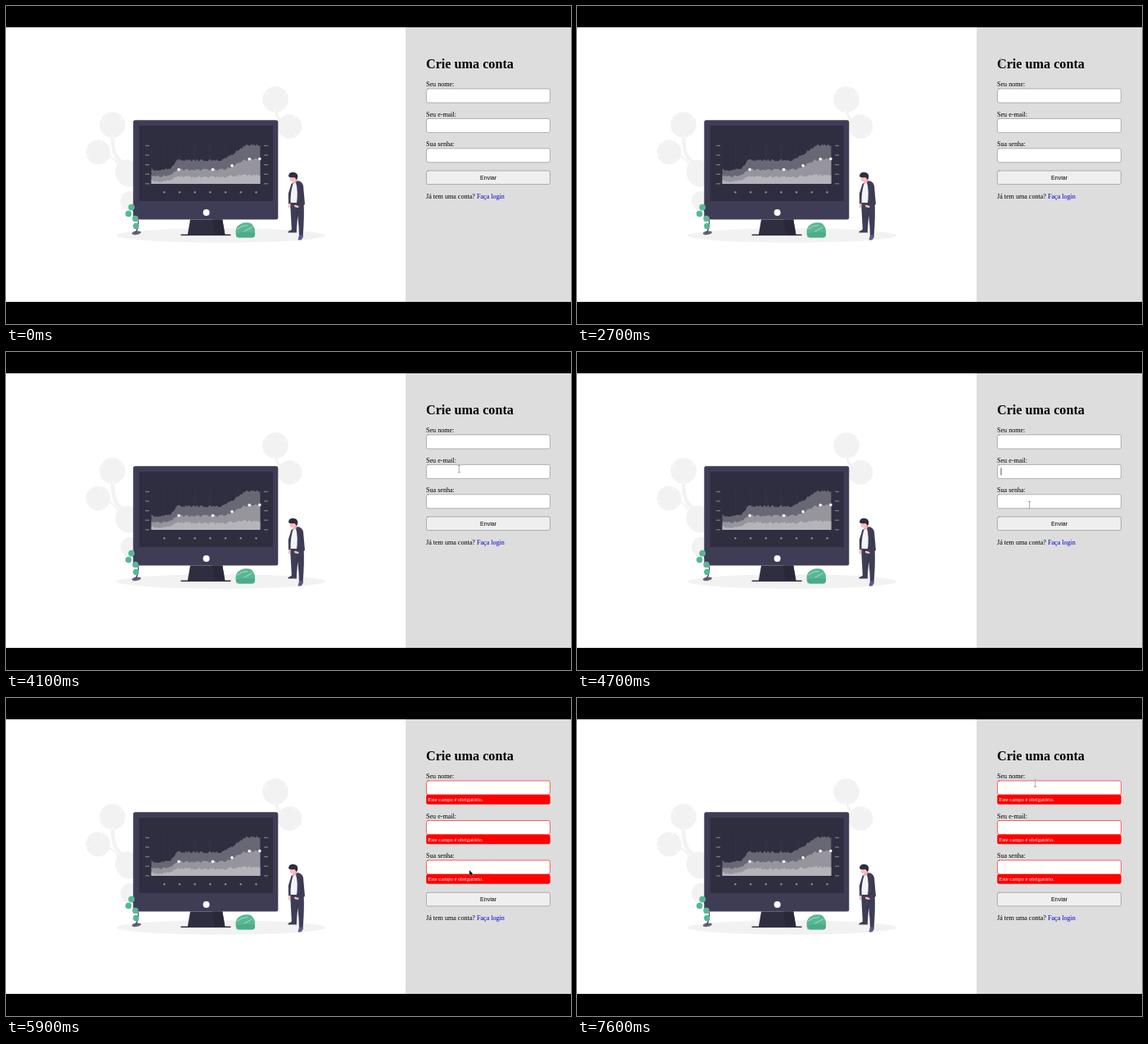
These frames come from a looping animation (690x388 px, 8000 ms). An HTML page with a canvas:

```html
<!DOCTYPE html>
<html lang="pt">
<head>
<meta charset="utf-8">
<title>Crie uma conta</title>
<style>
html, body { margin: 0; width: 100%; height: 100%; overflow: hidden; background: #000; }
canvas { display: block; width: 690px; height: 388px; }
</style>
</head>
<body>
<canvas id="stage" width="690" height="388"></canvas>
<script>
const ctx = document.getElementById('stage').getContext('2d');
const LOOP = 8000, STEP = 100, FAIL_AT = 5900;
const ZOOM = 690 / 1366;
const SERIF = '"Liberation Serif", "Times New Roman", serif';
const SANS = '"Liberation Sans", Arial, sans-serif';
const NAVY = '#3f3d56', DARK = '#2f2e41', PALE = '#f2f2f2', GREEN = '#57b894', SKIN = '#fbbebe';

// ---- helpers ----
function smooth(v, from, to) {
  const u = Math.min(1, Math.max(0, (v - from) / (to - from)));
  return u * u * (3 - 2 * u);
}
function randomizer(seed) {
  return () => (seed = seed * 16807 % 2147483647) / 2147483647;
}
function rect(x, y, w, h, fill) {
  ctx.fillStyle = fill;
  ctx.fillRect(x, y, w, h);
}
function round(x, y, w, h, r, fill, stroke) {
  ctx.beginPath();
  ctx.roundRect(x, y, w, h, r);
  ctx.fillStyle = fill;
  ctx.fill();
  if (stroke) {
    ctx.strokeStyle = stroke;
    ctx.lineWidth = 0.6;
    ctx.stroke();
  }
}
function oval(x, y, rx, ry, fill, turn = 0) {
  ctx.beginPath();
  ctx.ellipse(x, y, rx, ry, turn, 0, 7);
  ctx.fillStyle = fill;
  ctx.fill();
}
const disc = (x, y, r, fill) => oval(x, y, r, r, fill);
function shape(d, fill) {
  ctx.fillStyle = fill;
  ctx.fill(new Path2D(d));
}
function line(d, color, width) {
  ctx.strokeStyle = color;
  ctx.lineWidth = width;
  ctx.lineCap = 'round';
  ctx.stroke(new Path2D(d));
}
// Sizes are page pixels before zooming
function text(str, x, y, size, color, family = SERIF, weight = '', align = 'left') {
  ctx.save();
  ctx.translate(x, y);
  ctx.scale(ZOOM, ZOOM);
  ctx.font = `${weight} ${size}px ${family}`;
  ctx.textAlign = align;
  ctx.fillStyle = color;
  ctx.fillText(str, 0, 0);
  ctx.restore();
}

// ---- illustration ----
// Round leaf with three small slits at its rim
function leaf(x, y, r, turn) {
  disc(x, y, r, PALE);
  for (let i = 0; i < 3; i++) {
    const a = turn + i * 2.1, c = Math.cos(a), s = Math.sin(a);
    line(`M${x + c * r} ${y + s * r}L${x + c * r * 0.75} ${y + s * r * 0.75}`, '#fff', 1);
  }
}

function foliage() {
  line('M130 158C130 188 139 187 151 199', PALE, 4.5);
  line('M114 180Q132 182 137 194', PALE, 2);
  line('M329 126Q331 139 339 143', PALE, 3);
  leaf(130, 145, 15.7, 3.6);
  leaf(112.5, 178.5, 15, 2.9);
  leaf(329, 114, 15.8, 3.7);
  leaf(346.5, 147, 14.8, 1);
  oval(149, 204, 15, 17, PALE, -0.5);
  oval(151, 238, 11, 12, PALE);
}

// Levels jump once near the left and climb again near the right
function level([base, jump, climb], x) {
  return base - jump * smooth(x, 198, 211) - climb * smooth(x, 260, 299);
}

function ridge(curve, seed, fill) {
  const random = randomizer(seed);
  ctx.beginPath();
  ctx.moveTo(177.6, 217);
  for (let x = 177.6; x < 310; x += 1.5) ctx.lineTo(x, level(curve, x) + (random() - 0.5) * 3);
  ctx.lineTo(310.4, level(curve, 310));
  ctx.lineTo(310.4, 217);
  ctx.fillStyle = fill;
  ctx.fill();
}

function chart() {
  const middle = [207.5, 7.5, 13];
  for (let i = 0; i < 7; i++) {
    const x = 193.3 + i * 18.7;
    rect(x - 0.25, 168, 0.5, 49, '#393848');
    disc(x, 227.2, 1.2, '#8b8a94');
  }
  for (let i = 0; i < 5; i++) {
    const y = 169.8 + i * 11.6;
    rect(170, y, 5, 1.3, '#777683');
    rect(315, y, 5, 1.3, '#777683');
  }
  ridge([199.5, 11.5, 18.5], 41, '#686774');
  ridge(middle, 97, '#96959e');
  ridge([213.5, 5, 2.5], 63, '#b5b4bb');
  for (const x of [211, 252.5, 276, 297.2, 309.8]) disc(x, level(middle, x) - 0.4, 1.8, '#fff');
}

function monitor() {
  round(155.3, 139.3, 177, 121.2, 2.5, NAVY);
  rect(162.5, 146, 163.5, 92, DARK);
  shape('M225 260.5H264.3L267.4 279H221.8Z', DARK);
  shape('M252 260.5H264.3L267.4 279H255Z', '#292838');
  rect(213.5, 278.6, 61, 1.5, DARK);
  disc(244.6, 252, 4, '#fff');
  chart();
}

function plants() {
  oval(159.3, 276.8, 5.6, 2.2, '#65617d', -0.15);
  line('M158.5 276Q164 267 160 258T152.5 245', NAVY, 1.2);
  disc(153.2, 245.6, 3.9, GREEN);
  disc(149.6, 253.6, 3.8, GREEN);
  disc(158, 259.4, 3.7, GREEN);
  disc(158.7, 268.4, 3.6, GREEN);
  shape('M281.5 282Q279 274 282.5 269Q287 264 294 264.3Q300 264 301.5 268Q304.5 271 304 277Q304.5 282 301 282.5H284Z', GREEN);
  line('M282.5 272Q289 267 295 267.5M291 275L300 270', '#e3f3ed', 0.6);
  shape('M280.5 278Q292 274 304.2 277Q304 282 301 282.5H284Z', '#4fab8a');
}

function man() {
  shape('M347 239H357.5L354.8 275H349Z', NAVY);
  shape('M353 239H363.6Q364.5 258 362.6 280.5H358Q357.5 258 353 239Z', NAVY);
  line('M357 245L354.8 258', DARK, 0.6);
  shape('M344.5 275Q348 273.5 349 272.5L354.8 274L355 276.4H344.6Z', NAVY);
  shape('M358 279.5H362.8V282L360.5 285.4H356.5Z', '#575a89');
  shape('M347.5 219L354 214.5L356 240H347Z', '#f4f4f6');
  shape('M353.5 213.5Q361 212.5 363 219L365 242L361 244H354.5Q357.5 226 353.5 213.5Z', NAVY);
  shape('M348.5 217L351 215.5Q347 227 347.6 240L345 242L344.8 229Z', NAVY);
  line('M360.5 221L361.5 236L356 242.5', DARK, 0.6);
  oval(346, 244, 1.4, 2.3, SKIN, 0.3);
  oval(354.8, 244.4, 3, 1.3, SKIN, 0.25);
  shape('M350 210H355.5L354.5 215.5L351 217Z', '#eeb0b0');
  oval(350.3, 210, 3.6, 4.5, SKIN, 0.2);
  shape('M345 208Q345 203 350 202.7Q357 203 356.3 209L355 212.5Q353 209 352 209Q347 210 345 208Z', DARK);
}

function illustration() {
  foliage();
  oval(262.5, 280, 127.5, 8.7, PALE);
  monitor();
  plants();
  man();
}

// ---- form ----
const LEFT = 513.4, WIDTH = 151, HEIGHT = 17;
const LABELS = ['Seu nome:', 'Seu e-mail:', 'Sua senha:'];
const fieldTop = (i, failed) => 101 + i * (failed ? 48.5 : 36.4);

function form(failed) {
  text('Crie uma conta', 513, 76.1, 32, '#000', SERIF, 'bold');
  LABELS.forEach((label, i) => {
    const y = fieldTop(i, failed);
    text(label, 513, y - 2.7, 16, '#000');
    if (failed) {
      round(LEFT - 0.2, y + HEIGHT, WIDTH + 0.4, 11.8, 2.2, '#f00');
      text('Este campo é obrigatório.', 515.4, y + 25.2, 13, '#fff');
    }
    round(LEFT, y, WIDTH, HEIGHT, 2.2, '#fff', failed ? '#f00' : '#858585');
  });
  const y = fieldTop(3, failed) - 9.2;
  round(LEFT, y, WIDTH, HEIGHT - 0.4, 2.2, '#efefef', '#858585');
  text('Enviar', 589, y + 10.6, 14, '#000', SANS, '', 'center');
  text('Já tem uma conta?', 513, y + 34, 16, '#000');
  text('Faça login', 575, y + 34, 16, '#0000d0');
}

// ---- pointer and caret ----
const APPEAR = 2700;
const MOVES = [
  { from: 2700, to: 3000, x: 547, y: 105 },
  { from: 3700, to: 4200, x: 554, y: 147 },
  { from: 4500, to: 4700, x: 552.5, y: 186.6 },
  { from: 5300, to: 5600, x: 566, y: 210.3 },
  { from: 5900, to: 6600, x: 559.7, y: 104 }
];
const CARETS = [
  { from: 3400, to: 3900, field: 0 },
  { from: 4400, to: 5000, field: 1 },
  { from: 5200, to: 5800, field: 2 },
  { from: 7000, to: 7600, field: 0 }
];

function pointer(t) {
  if (t < APPEAR) return;
  let x = 518, y = 68.5;
  for (const move of MOVES) {
    const u = smooth(t, move.from, move.to);
    x += (move.x - x) * u;
    y += (move.y - y) * u;
  }
  // The pointer's look follows the layout one step late
  const late = t - STEP >= FAIL_AT;
  const overField = LABELS.some((_, i) => y > fieldTop(i, late) && y < fieldTop(i, late) + HEIGHT);
  ctx.save();
  ctx.translate(x, y);
  if (overField || y < 78) {
    const d = 'M-1.2 -4.2H1.2M0 -4.2V4.2M-1.2 4.2H1.2';
    line(d, '#e4e4e4', 1.2);
    line(d, '#858585', 0.55);
  } else {
    const d = 'M0 0V6L1.4 4.8L2.4 7L3.4 6.5L2.4 4.4H4.3Z';
    line(d, '#ddd', 0.6);
    shape(d, '#000');
  }
  ctx.restore();
}

function caret(t) {
  for (const { from, to, field } of CARETS) {
    if (t >= from && t < to) rect(517.6, fieldTop(field, t >= FAIL_AT) + 4, 0.8, 9, '#222');
  }
}

function draw(now) {
  const t = Math.floor(now % LOOP / STEP) * STEP;
  rect(0, 0, 690, 388, '#000');
  rect(0, 26, 488, 335, '#fff');
  rect(488, 26, 202, 335, '#ddd');
  illustration();
  form(t >= FAIL_AT);
  caret(t);
  pointer(t);
}

const start = performance.now();
function tick() {
  draw(performance.now() - start);
  requestAnimationFrame(tick);
}
tick();
</script>
</body>
</html>
```
